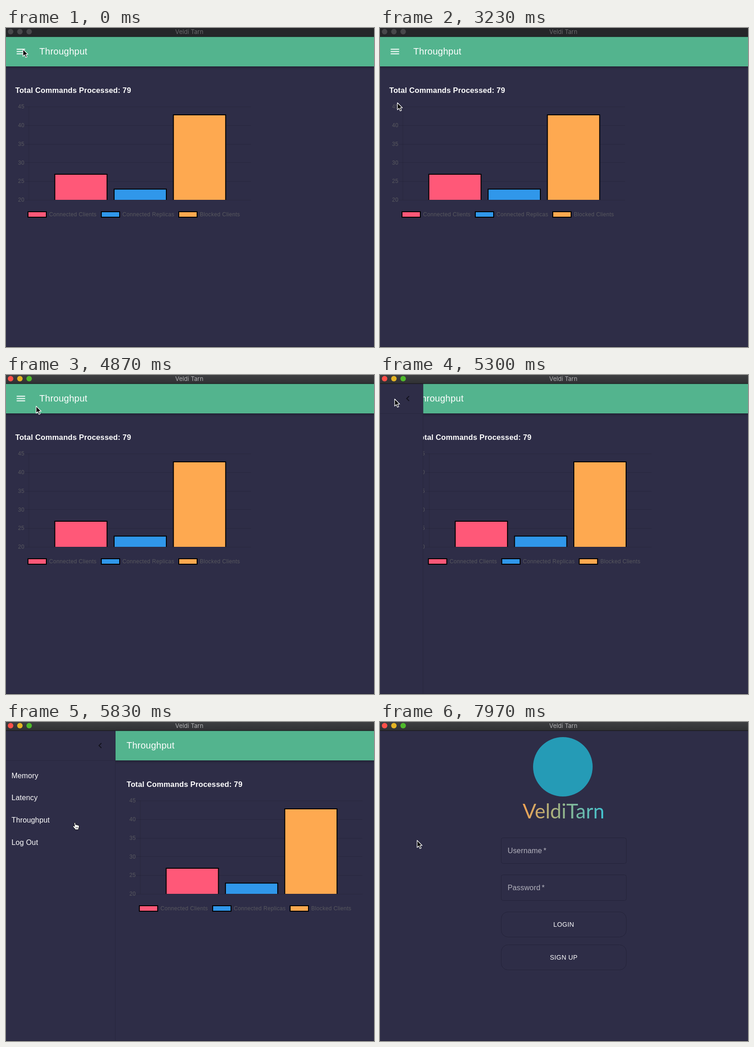
An HTML page for the animation above (8000 ms loop, 803 by 698 pixels).

```html
<!DOCTYPE html>
<html lang="en">
<head>
<meta charset="utf-8">
<title>Throughput</title>
<style>
  html, body { margin: 0; width: 100%; height: 100%; overflow: hidden; background: #2e2d47; }
  svg { display: block; width: 803px; height: 698px; }
  text { font-family: "Liberation Sans", Arial, sans-serif; fill: #fff; }
  .title { font-size: 20px; letter-spacing: .25px; }
  .heading { font-size: 16.4px; font-weight: bold; letter-spacing: .19px; }
  .item { font-size: 16px; letter-spacing: .15px; }
  .button { font-size: 14px; letter-spacing: .4px; text-anchor: middle; }
  .small { font-size: 12px; letter-spacing: .33px; fill: #59595f; }
  .tick { text-anchor: end; }
  .field { font-size: 16px; letter-spacing: .15px; fill: #b4b3be; }
  .window { font: 13px Inter, Roboto, sans-serif; text-anchor: middle; }
  .brand { font: 44px Lato, sans-serif; text-anchor: middle; fill: url(#brand); }
  .line { stroke: #000; stroke-opacity: .13; fill: none; }
  .box { stroke: #24233a; fill: none; }
</style>
</head>
<body>
<svg viewBox="0 0 803 698">
  <defs>
    <linearGradient id="brand" gradientUnits="userSpaceOnUse" x1="310" x2="491" y1="0" y2="0">
      <stop offset="0" stop-color="#f3a352"/>
      <stop offset=".5" stop-color="#93b58c"/>
      <stop offset="1" stop-color="#3fc3d2"/>
    </linearGradient>
    <linearGradient id="chrome" x2="0" y2="1">
      <stop offset="0" stop-color="#3d3e41"/>
      <stop offset="1" stop-color="#303134"/>
    </linearGradient>
    <linearGradient id="shade" x2="0" y2="1">
      <stop offset="0" stop-opacity=".28"/>
      <stop offset=".4" stop-opacity=".12"/>
      <stop offset="1" stop-opacity="0"/>
    </linearGradient>
  </defs>
  <rect width="803" height="698" fill="#2e2d47"/>

  <g id="dashboard">
    <g id="content">
      <text class="heading" x="20.2" y="142">Total Commands Processed: 79</text>
      <g id="chart"></g>
    </g>
    <g id="appbar">
      <rect y="84" width="803" height="8" fill="url(#shade)"/>
      <rect y="19" width="803" height="65" fill="#53b48e"/>
    </g>
    <path id="menu" d="M23.3 46.5h18.4M23.3 51.5h18.4M23.3 56.5h18.4" stroke="#fff" stroke-width="2"/>
    <text id="heading" class="title" y="58">Throughput</text>
    <g id="drawer">
      <rect y="19" width="239" height="679" fill="#2e2d47"/>
      <path class="line" d="M238.5 19V698M0 84.5H238"/>
      <path d="M15.41 7.41L14 6l-6 6 6 6 1.41-1.41L10.83 12z" transform="translate(193.5 39.5)" fill-opacity=".6"/>
      <g id="items"></g>
    </g>
  </g>

  <g id="login">
    <circle cx="399" cy="98" r="65" fill="#259bb6"/>
    <text class="brand" x="400.5" y="211">VeldiTarn</text>
    <rect class="box" x="264.5" y="253.5" width="273" height="56" rx="4"/>
    <text class="field" x="278.5" y="287">Username</text>
    <text class="field" x="356.8" y="287">*</text>
    <rect class="box" x="264.5" y="334.5" width="273" height="56" rx="4"/>
    <text class="field" x="278.5" y="368">Password</text>
    <text class="field" x="353" y="368">*</text>
    <rect class="box" x="264.5" y="415.5" width="273" height="55" rx="15"/>
    <text class="button" x="401" y="448">LOGIN</text>
    <rect class="box" x="264.5" y="487.5" width="273" height="55" rx="15"/>
    <text class="button" x="401" y="520">SIGN UP</text>
  </g>

  <path d="M0 697.5H803" stroke="#232237"/>
  <rect id="bar" width="803" height="19"/>
  <path d="M0 18.75H803" stroke="#1b1b1e" stroke-width="1.5"/>
  <g id="lights">
    <circle cx="10" cy="8" r="6"/><circle cx="30.3" cy="8" r="6"/><circle cx="50.5" cy="8" r="6"/>
  </g>
  <text id="name" class="window" x="400" y="13">Veldi Tarn</text>

  <g id="cursor" stroke-linejoin="round">
    <path id="arrow" d="M0 0V15.6L3.6 12.2L6.1 18L8.8 16.8L6.3 11.2H11Z" stroke="#fff" stroke-width="1.3"/>
    <g id="hand" fill="#fff" stroke="#000">
      <path d="M-1.3 1.6C-1.3 -.1 1.4 -.1 1.5 1.6L2 5.4C2.4 4.3 4.4 4.4 4.6 6C5.2 5 7 5.2 7.1 6.7C7.8 6 9.5 6.3 9.5 8C9.6 11 8.9 12.3 8.2 13.6V16H.6V14.4L-3.5 9.8C-4.7 8.2 -2.9 6.8 -1.5 8L-.4 9Z"/>
      <path d="M2.6 10V13M4.6 10V13M6.6 10V13" stroke-width=".8"/>
    </g>
  </g>
</svg>
<script>
const LOOP = 8000;
const ACTIVE = 4040, SLIDE = 5269, SHIFT = 5284.6, OPEN_TIME = 225, LOGOUT = 7868;
const DRAWER = 239, TRAVEL = 243;

// Pointer stops: time, x, y
const stops = [
  [0, 37, 46.5], [2000, 37, 46.5], [2400, 687, 433], [2800, 170, 401],
  [3230, 38, 163.5], [3630, 42, 62], [4000, 600, 288], [4170, 631.7, 296],
  [4470, 420, 232], [4960, 32, 52.5], [5700, 32, 52.5], [5830, 150, 219.7],
  [6120, 168, 214], [6500, 98, 251], [6630, 98, 251], [7170, 81, 259], [LOOP, 81, 259]
];

const $ = id => document.getElementById(id);
const show = (id, on) => $(id).setAttribute("display", on ? "inline" : "none");
const move = (id, x, y = 0) => $(id).setAttribute("transform", `translate(${x} ${y})`);
const clamp = v => Math.min(1, Math.max(0, v));

function add(parent, tag, attrs, label) {
  const el = document.createElementNS("http://www.w3.org/2000/svg", tag);
  for (const key in attrs) el.setAttribute(key, attrs[key]);
  if (label) el.textContent = label;
  $(parent).appendChild(el);
}

function buildChart() {
  for (let i = 0; i < 6; i++) {
    const y = 172 + i * 40.75;
    add("chart", "path", { class: "line", d: `M40 ${Math.round(y) + .5}H535` });
    add("chart", "text", { class: "small tick", x: 40.3, y: y + 4.3 }, String(45 - 5 * i));
  }
  add("chart", "path", { class: "line", d: "M50 172V376" });
  const series = [
    ["Connected Clients", "#ff5878", 27, 48],
    ["Connected Replicas", "#3097ea", 23, 208],
    ["Blocked Clients", "#fea950", 43, 377]
  ];
  series.forEach(([label, fill, value, x], i) => {
    const left = 106.5 + i * 129.4;
    const top = 376 - (value - 20) * 8.13 + 1;
    const style = { fill, stroke: "#000", "stroke-width": 2 };
    add("chart", "path", { ...style, d: `M${left} 376V${top}h114V376` });
    add("chart", "rect", { ...style, x, y: 402, width: 40, height: 12 });
    add("chart", "text", { class: "small", x: x + 46, y: 412.3 }, label);
  });
}

function buildItems() {
  ["Memory", "Latency", "Throughput", "Log Out"].forEach((label, i) =>
    add("items", "text", { class: "item", x: 12, y: 122.8 + i * 48.6 }, label));
}

// cubic-bezier(0, 0, .2, 1)
function easeOut(x) {
  if (x <= 0 || x >= 1) return clamp(x);
  let lo = 0, hi = 1;
  for (let i = 0; i < 24; i++) {
    const s = (lo + hi) / 2;
    if (.6 * s * s + .4 * s ** 3 < x) lo = s; else hi = s;
  }
  return lo * lo * (3 - 2 * lo);
}

function pointer(t) {
  let i = 1;
  while (i < stops.length - 1 && stops[i][0] < t) i++;
  const [t0, x0, y0] = stops[i - 1], [t1, x1, y1] = stops[i];
  const u = clamp((t - t0) / (t1 - t0));
  const k = u * u * (3 - 2 * u);
  return [x0 + (x1 - x0) * k, y0 + (y1 - y0) * k];
}

function render(t) {
  const active = t >= ACTIVE, opened = t >= SLIDE, out = t >= LOGOUT;
  const slide = easeOut((t - SLIDE) / OPEN_TIME);
  const shift = easeOut((t - SHIFT) / OPEN_TIME);

  show("dashboard", !out);
  show("login", out);
  show("menu", !opened);
  show("drawer", opened);
  move("drawer", DRAWER * (slide - 1));
  move("content", TRAVEL * shift);
  move("appbar", DRAWER * shift);
  move("heading", opened ? 20 + TRAVEL * shift : 72.8);

  $("bar").setAttribute("fill", active ? "url(#chrome)" : "#252629");
  $("name").style.fill = active ? "#b3b3b5" : "#6b6b6d";
  const colors = active ? ["#ff5049", "#e4b424", "#4fba2c"] : Array(3).fill("#48484b");
  [...$("lights").children].forEach((dot, i) => dot.setAttribute("fill", colors[i]));

  const [x, y] = pointer(t);
  const overMenu = active && !opened && x < 56 && y < 76;
  const overItem = opened && !out && x < DRAWER && y > 93;
  show("hand", overMenu || overItem);
  show("arrow", !(overMenu || overItem));
  move("cursor", x, y);
}

buildChart();
buildItems();
const start = performance.now();
function tick() {
  render((performance.now() - start) % LOOP);
  requestAnimationFrame(tick);
}
tick();
</script>
</body>
</html>
```
